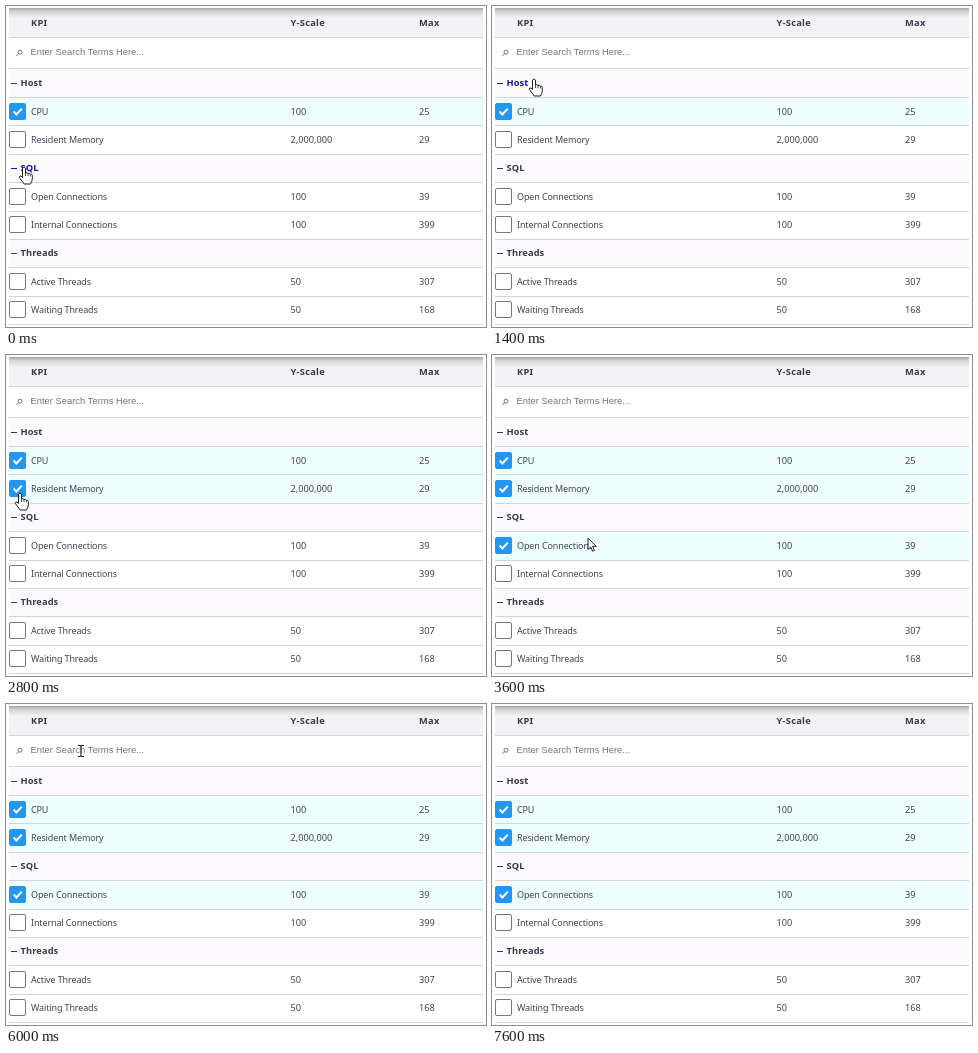
Recreate the animation shown at these times as an HTML page with a canvas. Size 480 by 321 pixels, loop 7.8 s.

```html
<!DOCTYPE html>
<html lang="en">
<head>
<meta charset="utf-8">
<title>KPI table</title>
<style>
html, body { margin: 0; width: 100%; height: 100%; overflow: hidden; background: #fff; }
canvas { display: block; }
</style>
</head>
<body>
<canvas id="stage" width="480" height="321"></canvas>
<script>
const ctx = document.getElementById('stage').getContext('2d');
const LOOP = 7800, STEP = 200, ROW = 28.42, TOP = 63.4, LEFT = 3, RIGHT = 477;
const INK = '#3d4350', BOLD_INK = '#363b47', LINK = '#1414b4', TINT = '#efffff', LINE = '#d3d3d8';
const SANS = '"Noto Sans", "Open Sans", sans-serif';
const INPUT = '"Liberation Sans", Arial, sans-serif';

const groups = [
  { name: 'Host', items: [['CPU', '100', '25', 0], ['Resident Memory', '2,000,000', '29', 2800]] },
  { name: 'SQL', items: [['Open Connections', '100', '39', 3200], ['Internal Connections', '100', '399', LOOP]] },
  { name: 'Threads', items: [['Active Threads', '50', '307', LOOP], ['Waiting Threads', '50', '168', LOOP]] }
];

// Left edges of the two number columns, depending on the widest visible cells
const columns = { all: [284.5, 413], noSQL: [266, 407], noHost: [296.5, 410] };

// Pointer path: time, x, y
const path = [
  [0, 18, 161], [400, 19, 162], [800, 18, 160], [1000, 24, 135], [1200, 38, 92],
  [1400, 42, 73], [1600, 41, 75], [2000, 38, 78], [2200, 28, 102], [2400, 16, 126],
  [2600, 12, 134], [2800, 14, 138], [3000, 13, 200], [3200, 13, 191], [3400, 52, 188],
  [3600, 96, 183], [3800, 96, 150], [4000, 88, 90], [4200, 78, 44], [4400, 75, 48],
  [4800, 74, 48], [6000, 75, 47], [7000, 75, 47], [7200, 90, 38], [7400, 120, -30], [7800, 120, -30]
];

const queries = [[0, ''], [4800, 'host'], [5800, 'ho'], [6000, ''], [6400, 'sq'], [6600, 'sql'], [7200, '']];
const within = (t, a, b) => t >= a && t < b;

function pointerAt(t) {
  const i = path.findIndex((p, n) => t < path[n + 1][0]);
  const [a, b] = [path[i], path[i + 1]], k = (t - a[0]) / (b[0] - a[0]);
  return [a[1] + (b[1] - a[1]) * k, a[2] + (b[2] - a[2]) * k];
}

function text(str, x, y, size, color, weight = 400, family = SANS, spacing = 0) {
  ctx.font = `${weight} ${size}px ${family}`;
  ctx.letterSpacing = spacing + 'px';
  ctx.fillStyle = color;
  ctx.fillText(str, x, y);
}

function rect(x, y, w, h, color) {
  ctx.fillStyle = color;
  ctx.fillRect(x, y, w, h);
}

function stroke(d, color, width = 1) {
  ctx.strokeStyle = color;
  ctx.lineWidth = width;
  ctx.stroke(new Path2D(d));
}

function band(y, h, color) {
  const top = Math.round(y), bottom = Math.round(y + h);
  rect(LEFT, top, RIGHT - LEFT, bottom - top, color);
  rect(LEFT, bottom - 1, RIGHT - LEFT, 1, LINE);
}

function header(cols) {
  const shade = ctx.createLinearGradient(0, 2, 0, 12);
  shade.addColorStop(0, '#a6a6a8');
  shade.addColorStop(0.35, '#d4d4d7');
  shade.addColorStop(1, '#f3f2f5');
  band(2, 30, shade);
  const title = (str, x) => text(str, x, 20, 9.3, BOLD_INK, 700, SANS, 0.25);
  title('KPI', 25);
  title('Y-Scale', cols[0]);
  title('Max', cols[1]);
}

function searchRow(query) {
  band(32, 31, query ? TINT : '#fff');
  if (query) {
    stroke('M11.5 45l5 5m0-5l-5 5', '#555');
    text(query, 25, 49, 9.4, '#999', 400, INPUT);
    rect(Math.round(25 + ctx.measureText(query).width), 41, 1, 10, '#555');
  } else {
    stroke('M12.6 47.7l-2.2 2.2M16 46.2a2 2 0 1 1-4 0a2 2 0 1 1 4 0', '#666', 0.9);
    text('Enter Search Terms Here...', 24.5, 49, 9.4, '#70757c', 400, INPUT);
  }
}

function groupRow(name, y, open, hover) {
  const mid = Math.floor(y + 14), color = hover ? LINK : BOLD_INK;
  band(y, ROW, '#fcfafd');
  rect(5, mid, 6, 1, color);
  if (!open) rect(7.5, mid - 3, 1, 7, color);
  text(name, 14.5, mid + 3.4, 9.3, color, 700, SANS, 0.1);
}

function itemRow([name, scale, max], y, checked, cols) {
  const mid = Math.floor(y + 14.2);
  band(y, ROW, checked ? TINT : '#fff');
  ctx.beginPath();
  ctx.roundRect(3.5, mid - 8.5, 16, 16, 1.5);
  ctx.fillStyle = checked ? '#2196f3' : '#fff';
  ctx.strokeStyle = checked ? '#2196f3' : '#777';
  ctx.lineWidth = 1;
  ctx.fill();
  ctx.stroke();
  if (checked) stroke(`M7.6 ${mid - 0.4}l2.8 2.8l5.4-5.8`, '#fff', 2.1);
  text(name, 25, mid + 3.4, 9, INK, 400, SANS, -0.13);
  text(scale, cols[0], mid + 3.4, 9.2, INK);
  text(max, cols[1], mid + 3.4, 9.2, INK);
}

const shapes = {
  hand: 'M-1.5 1Q0-1 1.5 1V6Q3 5 4 6.5Q5.5 5.7 6.3 7.2Q8 6.6 8.3 8.5V12Q8 14.5 6.5 17H0Q-1 15-2 14L-4.6 10.5Q-4.7 8.5-3 9L-1.5 10.5Z',
  arrow: 'M0 0V11.5L2.7 9L4.6 13.2L6.4 12.4L4.6 8.4H8.2Z',
  beam: 'M-3-5.5H-1L0-5L1-5.5H3M0-5V5M-3 5.5H-1L0 5L1 5.5H3'
};

function pointer(x, y, kind) {
  ctx.save();
  ctx.translate(x, y);
  if (kind === 'beam') {
    stroke(shapes.beam, '#222', 1.1);
  } else {
    ctx.fillStyle = '#fff';
    ctx.fill(new Path2D(shapes[kind]));
    stroke(shapes[kind], '#222', 1);
    if (kind === 'hand') stroke('M1.5 6V9M4 6.5V9M6.3 7.2V9.5', '#222', 0.8);
  }
  ctx.restore();
}

function draw(t) {
  const query = queries.filter(q => q[0] <= t).pop()[1];
  const folded = within(t, 200, 800) ? 'SQL' : within(t, 1600, 2000) ? 'Host' : '';
  const shown = groups.filter(g => g.name.toLowerCase().includes(query));
  const visible = name => name !== folded && shown.some(g => g.name === name);
  const cols = !visible('SQL') ? columns.noSQL : !visible('Host') ? columns.noHost : columns.all;
  const [px, py] = pointerAt(t);
  let kind = within(py, 31, 63) ? 'beam' : px < 20 && py > 92 ? 'hand' : 'arrow';
  let y = TOP;

  rect(0, 0, 480, 321, '#fff');
  header(cols);
  searchRow(query);
  for (const { name, items } of shown) {
    const hover = px < 60 && within(py, y, y + ROW);
    if (hover) kind = 'hand';
    groupRow(name, y, name !== folded, hover);
    y += ROW;
    if (name === folded) continue;
    for (const item of items) {
      itemRow(item, y, t >= item[3], cols);
      y += ROW;
    }
  }
  pointer(px, py, kind);
}

function tick() {
  const t = performance.now() % LOOP;
  draw(Math.floor(t / STEP) * STEP);
  requestAnimationFrame(tick);
}
tick();
</script>
</body>
</html>
```
